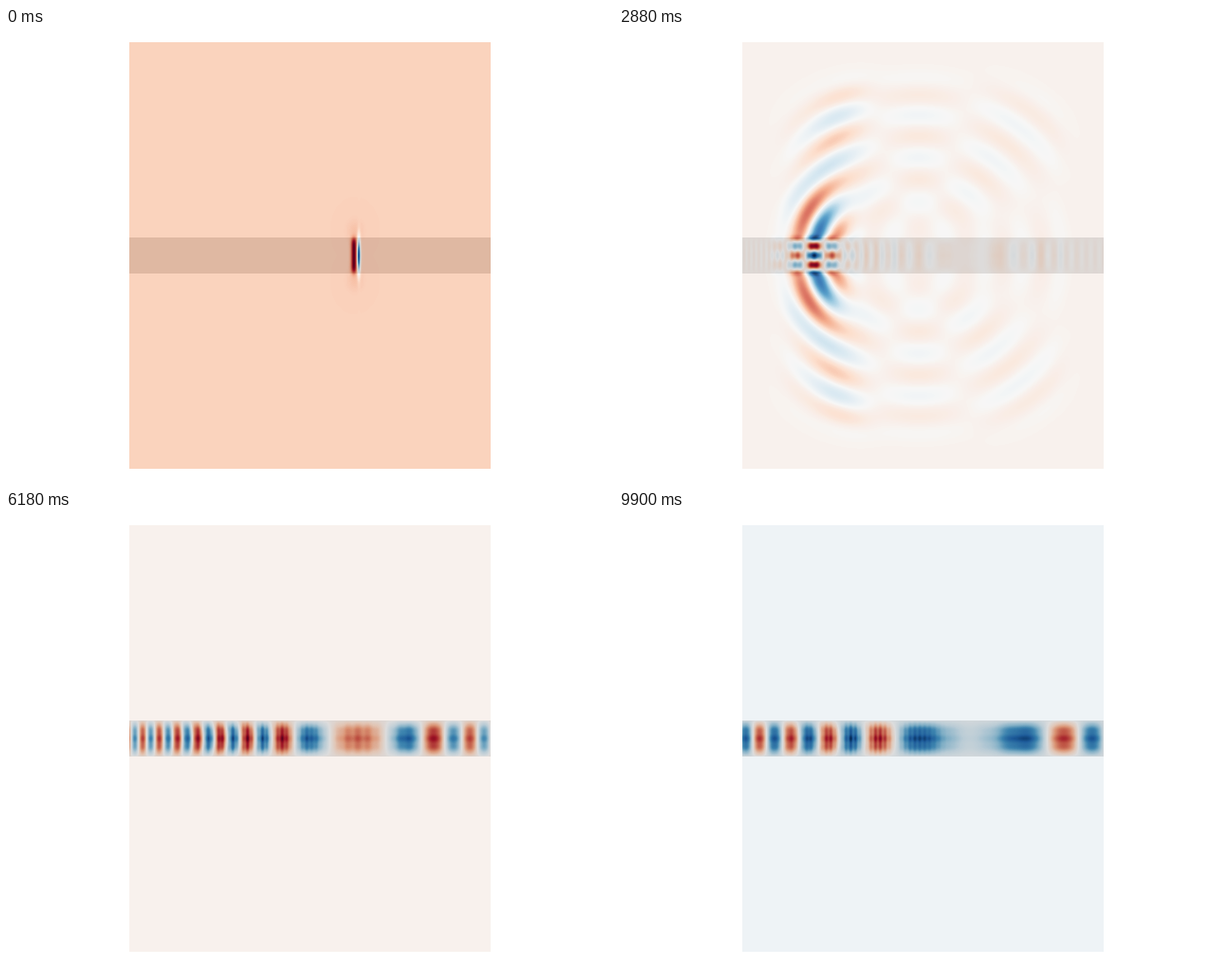
A matplotlib script that plays this animation: 640 by 480 pixels, repeating every 9960 ms.

```python
import numpy as np
import matplotlib.pyplot as plt
from matplotlib.animation import FuncAnimation

W, H, DPI = 640, 480, 100
LEFT, TOP, NX, NY = 130, 15, 381, 450
FRAMES, STEP = 166, 60

SOURCE = 371          # where the pulse is launched
MID, HALF = 240, 19   # axis and half height of the guide
HALF_WAVE = 21.5      # half wavelength outside the guide
OMEGA = 7 * np.pi / 11
BOUNCE, WALL = 52, 187  # when and where the packet turns round

x = (LEFT + 0.5 + np.arange(NX))[None, :]
y = (TOP + 0.5 + np.arange(NY))[:, None]
dy = np.abs(y - MID)
guide = (dy < HALF + 0.2).astype(float)


def gauss(u, width):
    return np.exp(-(u / width) ** 2)


def sigmoid(u):
    return 1 / (1 + np.exp(-np.clip(u, -50, 50)))


def ease(f, start, end):
    t = np.clip((f - start) / (end - start), 0, 1)
    return t * t * (3 - 2 * t)


# Profiles across the guide
guided = np.where(dy < HALF, np.cos(np.pi * dy / 52),
                  0.41 * np.exp(-(dy - HALF) / 4))
trapped = np.clip(np.cos(np.pi * dy / (2 * HALF + 0.5)), 0, 1) ** 0.8 * guide
trapped = trapped * (1 + 0.06 * np.cos(2 * np.pi * dy / 10))
outside = sigmoid((dy - HALF) / 1.5)
absorber = (sigmoid((x - 172) / 6) * sigmoid((470 - x) / 6)
            * sigmoid((185 - dy) / 9)
            * sigmoid((202 - np.hypot(x - 320, dy)) / 8))


def start_pulse():
    """First burst at the source line."""
    red = 0.42 * gauss(x - 366.8, 2.9) * sigmoid((17.5 - dy) / 2)
    blue = 0.64 * gauss(x - 372, 1.7) * gauss(dy, 17)
    halo = 0.035 * gauss(x - 368, 8) * gauss(dy - 26, 11)
    return red - blue + halo


def wave_train(f):
    """Guided wave leaving the source to the left."""
    late = f - (SOURCE - x) / 5.7
    envelope = gauss(late - 13, 8.5) / gauss(min(f, 13) - 13, 8.5)
    wave = np.cos(np.pi / 9 * (x - 367.5) + OMEGA * (f - 11))
    return guided * envelope * wave * sigmoid((SOURCE - x) / 0.8)


def ring(f, centre):
    r = np.hypot(x - centre, dy)
    return r, np.cos(np.pi * (r - 88) / HALF_WAVE - 2.016 * (f - 48))


def packet(f):
    """Higher mode running along the guide, with its radiating arms."""
    way = 1 if f > BOUNCE else -1
    speed = 14 if way > 0 else -4.7
    pos = WALL + speed * (f - BOUNCE)
    centre = pos - 68 * np.tanh((f - 55) / 3)

    beat = np.pi * (x - pos) / 20.5 - way * 2 * np.pi * (f - 48) / 3
    core = -1.25 * np.cos(np.pi * dy / 10) * np.cos(beat)
    core = core * gauss(x - pos, 24) * sigmoid((HALF + 1 - dy) / 1.5)

    r, wave = ring(f, centre)
    sweep = pos - way * (0.25 * np.maximum(dy - 60, 0) + 4)
    arms = (0.85 * gauss(dy - 22, 48) + 0.2) * gauss(x - sweep, 27)
    return core + wave * arms * outside * absorber


def faint_rings(f):
    total = 0
    for centre in (280, 352):
        r, wave = ring(f, centre)
        front = sigmoid((13.5 * (f - 14) - r) / 12)
        total = total + wave * front * sigmoid((r - 45) / 15)
    return 0.05 * total * absorber


def chirp(f):
    """Dispersed wave that stays in the guide, longest at the source."""
    spread = 47 * max(f - 23, 1)
    turn = 0.57 + 0.0925 * (f - 69)
    bend = 2 * np.cos(np.pi * dy / (2 * HALF)) * gauss(x - 235, 60)
    wave = np.cos(np.pi * (turn - (x - bend - SOURCE) ** 2 / spread))

    lump = 11 + 0.25 * max(f - 103, 0)
    grain = (1 + 0.13 * gauss(x - 260, 60) * np.cos(2 * np.pi * x / 5.2)
             + 0.1 * gauss(x - 375, 50) * np.cos(2 * np.pi * (x - 382) / lump))
    edge = 0.25 + 0.65 * ease(f, 45, 135)
    inner = sigmoid((x - 175) / 14) * sigmoid((465 - x) / 12)
    return trapped * wave * grain * (edge + (1 - edge) * inner)


def field(f):
    """Stages of the pulse, each fading into the next."""
    total = ease(f, 40, 82) * chirp(f)
    if f < 3:
        total = total + (1 - ease(f, 0, 3)) * start_pulse()
    if f < 40:
        total = total + ease(f, 0, 3) * (1 - ease(f, 28, 40)) * wave_train(f)
    if 16 < f < 92:
        total = total + ease(f, 24, 42) * (1 - ease(f, 70, 86)) * packet(f)
        total = total + ease(f, 16, 45) * (1 - ease(f, 70, 92)) * faint_rings(f)
    return total


def zero_level(f):
    """Place of the zero value on the colour scale."""
    swing = np.tanh(6 * (np.cos(2 * np.pi * (f - 117) / 96) + 0.75))
    ring_down = 0.105 * np.exp(-f / 9) * np.cos(OMEGA * f)
    return 0.496 + 0.024 * swing + ring_down


def scaled(f):
    values, zero = field(f), zero_level(f)
    size = max(values.max() / (1 - zero), -values.min() / zero)
    return zero + values / size


fig = plt.figure(figsize=(W / DPI, H / DPI), dpi=DPI, facecolor="white")
ax = fig.add_axes([LEFT / W, 1 - (TOP + NY) / H, NX / W, NY / H])
ax.axis("off")
style = dict(vmin=0, vmax=1, aspect="auto", interpolation="nearest")
ax.imshow(np.broadcast_to(guide, (NY, NX)), cmap="binary", **style)
image = ax.imshow(scaled(0), cmap="RdBu_r", alpha=0.9, **style)


def draw(f):
    image.set_data(scaled(f))
    return [image]


anim = FuncAnimation(fig, draw, frames=FRAMES, interval=STEP,
                     repeat=True, repeat_delay=0, blit=False)
plt.show()
```
